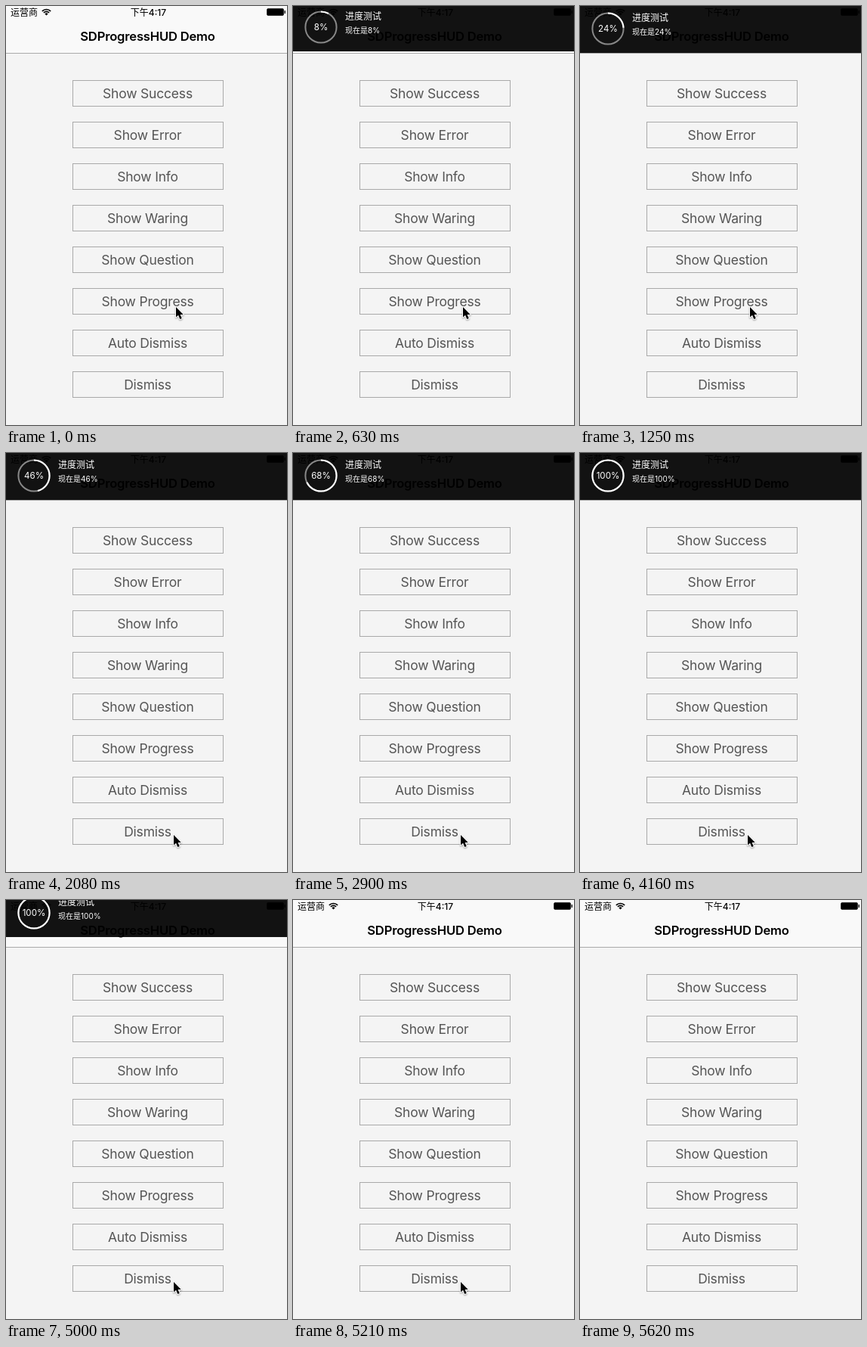
Animation, 372 px wide and 554 px high, one loop 6380 ms. Source, as an HTML page with a canvas:

```html
<!DOCTYPE html>
<html lang="zh">
<head>
<meta charset="utf-8">
<title>SDProgressHUD Demo</title>
<style>
  html, body { margin: 0; width: 100%; height: 100%; overflow: hidden; background: #f4f4f4; }
  canvas { display: block; width: 372px; height: 554px; }
</style>
</head>
<body>
<canvas id="stage" width="372" height="554"></canvas>
<script>
const ctx = document.getElementById('stage').getContext('2d');
const W = 372, H = 554, LOOP = 6380;
const FONT = 'Inter, "Noto Sans CJK SC", "Noto Sans CJK", sans-serif';
const BUTTONS = ['Show Success', 'Show Error', 'Show Info', 'Show Waring',
  'Show Question', 'Show Progress', 'Auto Dismiss', 'Dismiss'];
const BAR_H = 62;

// Pointer stops: start time, x, y
const POINTER = [[0, 225, 398], [1660, 224, 473], [1870, 222, 499],
  [2080, 222, 505], [5410, 268, 548]];
const POINTER_END = 5620;

function text(str, x, y, size, color, weight = 400, align = 'left', spacing = 0) {
  ctx.font = `${weight} ${size}px ${FONT}`;
  ctx.letterSpacing = spacing + 'px';
  ctx.textAlign = align;
  ctx.fillStyle = color;
  ctx.fillText(str, x, y);
}

function rect(x, y, w, h, color) {
  ctx.fillStyle = color;
  ctx.fillRect(x, y, w, h);
}

function arc(x, y, r, from, to, color, width) {
  ctx.beginPath();
  ctx.arc(x, y, r, from, to);
  ctx.strokeStyle = color;
  ctx.lineWidth = width;
  ctx.stroke();
}

function drawWifi(x, y) {
  const a = -Math.PI * 0.75, b = -Math.PI * 0.25;
  arc(x, y, 8, a, b, '#000', 1.7);
  arc(x, y, 5.1, a, b, '#000', 1.6);
  ctx.beginPath();
  ctx.moveTo(x, y);
  ctx.arc(x, y, 3, a, b);
  ctx.fillStyle = '#000';
  ctx.fill();
}

function drawBattery() {
  ctx.strokeStyle = '#333';
  ctx.lineWidth = 1;
  ctx.beginPath();
  ctx.roundRect(345.5, 3.5, 22, 9, 1.5);
  ctx.stroke();
  rect(346, 4, 21, 8, '#000');
  rect(368.5, 6, 1.5, 4, '#222');
}

function drawNav() {
  rect(0, 0, W, BAR_H, '#f9f9f9');
  rect(0, BAR_H, W, 1, '#aaa');
  text('运营商', 6, 12.5, 12, '#000');
  drawWifi(53.5, 12.5);
  text('下午4:17', 188.5, 12.5, 12, '#000', 500, 'center');
  drawBattery();
  text('SDProgressHUD Demo', 187.5, 46, 16.6, '#000', 600, 'center', -0.2);
}

function drawButtons() {
  BUTTONS.forEach((label, i) => {
    const y = 98 + i * 55;
    ctx.strokeStyle = '#a9a9a9';
    ctx.lineWidth = 1;
    ctx.strokeRect(88.5, y + 0.5, 199, 34);
    text(label, 187.5, y + 24, 17.5, '#555', 400, 'center', -0.2);
  });
}

function progressAt(t) {
  const step = Math.floor((t - 618) / 207.4);
  return Math.min(100, Math.round(8 + 5.42 * step));
}

function drawHud(t) {
  if (t < 630 || t >= 5210) return;
  const dy = t < 830 ? -2 : t < 5000 ? 0 : -13;
  const p = progressAt(t), top = -Math.PI / 2;
  ctx.save();
  ctx.translate(0, dy);
  rect(0, -dy, W, BAR_H + dy, 'rgba(0,0,0,0.93)');
  arc(37, 30, 20.6, 0, Math.PI * 2, '#888', 2);
  arc(37, 30, 20.6, top, top + Math.PI * 2 * p / 100, '#fff', 2);
  text(p + '%', 37, 34, 11.6, '#fff', 400, 'center');
  text('进度测试', 69, 20, 12, '#fff');
  text(`现在是${p}%`, 69, 37.5, 10, '#fff');
  ctx.restore();
}

function drawPointer(t) {
  if (t >= POINTER_END) return;
  const [, x, y] = POINTER.filter(stop => t >= stop[0]).pop();
  ctx.save();
  ctx.translate(x, y);
  const arrow = new Path2D('M0 0V13.6L3.1 10.8L5.3 16L7.8 15L5.6 9.9H9.8Z');
  ctx.lineJoin = 'round';
  ctx.lineWidth = 2;
  ctx.strokeStyle = '#fff';
  ctx.shadowColor = 'rgba(0,0,0,0.35)';
  ctx.shadowBlur = 2;
  ctx.shadowOffsetY = 1;
  ctx.stroke(arrow);
  ctx.shadowColor = 'transparent';
  ctx.fillStyle = '#000';
  ctx.fill(arrow);
  ctx.restore();
}

function draw(t) {
  rect(0, 0, W, H, '#f4f4f4');
  drawNav();
  drawButtons();
  drawHud(t);
  drawPointer(t);
}

const start = performance.now();
function tick() {
  draw((performance.now() - start) % LOOP);
  requestAnimationFrame(tick);
}
tick();
</script>
</body>
</html>
```
